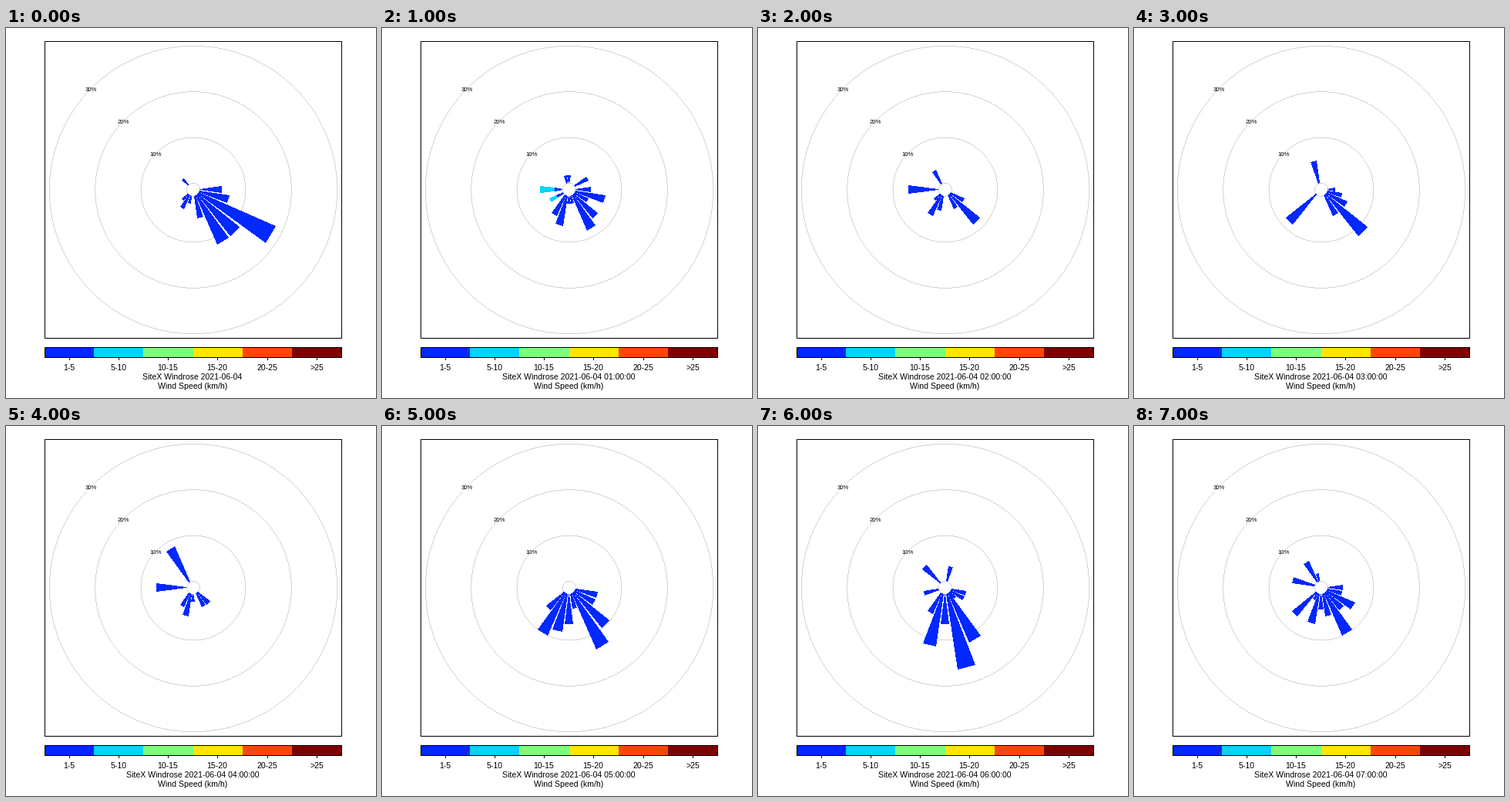
These frames come from a looping animation (480 px wide and 480 px high, 8 s). A matplotlib script:

```python
import matplotlib.pyplot as plt
import numpy as np
from matplotlib.animation import FuncAnimation

SIZE, DPI = 480, 72
CX, CY = 243, 210
HUB = 8.5            # radius of the empty centre
PER_SAMPLE = 9.9     # pixels for one sample of sixty
SECTOR, HALF = 15, 6.3
GREY, BLACK = (211, 211, 211), (0, 0, 0)
COLORS = [plt.cm.jet(k / 6, bytes=True)[:3] for k in range(1, 7)]
LABELS = ["1-5", "5-10", "10-15", "15-20", "20-25", ">25"]
BEARINGS = np.arange(0, 360, SECTOR)

# Main wind directions of each hour: bearing -> strength in samples
PEAKS = [
    {90: 3, 120: 11, 150: 7, 210: 2, 315: 1},
    {60: 2, 105: 4.2, 144: 5.3, 202: 4.5, 240: 1, 270: 1, 352: 2.5},
    {135: 5, 205: 3, 270: 4, 330: 2},
    {105: 2, 135: 7, 225: 5, 345: 3},
    {142: 3, 200: 3, 270: 4, 330: 5},
    {112: 3.3, 145: 8.5, 185: 4.5, 212: 5.9},
    {15: 2, 112: 2, 160: 10.5, 195: 7, 250: 2.5, 315: 3},
    {90: 2, 120: 4, 152: 6, 195: 3.7, 225: 4, 285: 3, 336: 5.5},
]
BRISK_PEAKS = {1: {240: 1, 270: 2}}    # second speed class

ROWS, COLS = np.mgrid[:SIZE, :SIZE] + 0.5

plt.rcParams["font.family"] = "Liberation Sans"
fig = plt.figure(figsize=(SIZE / DPI, SIZE / DPI), dpi=DPI, facecolor="white")
ax = fig.add_axes([0, 0, 1, 1])
ax.axis("off")


def samples(peaks):
    """Sum of bell curves per sector: broad in the south, narrow elsewhere."""
    total = np.zeros(len(BEARINGS))
    for bearing, strength in peaks.items():
        spread = 15 if 100 <= bearing <= 215 else 7.5
        gap = (BEARINGS - bearing + 180) % 360 - 180
        total += strength * np.exp(-(gap / spread) ** 2)
    return np.round(total).astype(int)


def polar(radius, bearing):
    a = np.radians(bearing)
    return CX + radius * np.sin(a), CY - radius * np.cos(a)


def paint_wedge(canvas, bearing, first, last, color):
    """Straight-ended spoke covering samples first..last, without smoothing."""
    r0, r1 = HUB + PER_SAMPLE * first, HUB + PER_SAMPLE * last
    corners = [(r0, -HALF), (r1, -HALF), (r1, HALF), (r0, HALF)]
    pts = np.floor([polar(r, bearing + d) for r, d in corners])
    inside = np.ones((SIZE, SIZE), bool)
    for (xa, ya), (xb, yb) in zip(pts, np.roll(pts, -1, axis=0)):
        inside &= (xb - xa) * (ROWS - ya) >= (yb - ya) * (COLS - xa)
    canvas[inside] = color


def paint_circle(canvas, radius):
    reach = np.ceil(radius / np.sqrt(2))
    along = np.arange(-reach, reach) + 0.5
    across = np.sqrt(radius ** 2 - along ** 2)
    for side in (-across, across):
        for dx, dy in ((along, side), (side, along)):
            x, y = np.floor(CX + dx), np.floor(CY + dy)
            canvas[y.astype(int), x.astype(int)] = GREY


def paint_box(canvas, x0, y0, x1, y1):
    canvas[[y0, y1], x0:x1 + 1] = BLACK
    canvas[y0:y1 + 1, [x0, x1]] = BLACK


def label(x, y, text, size=10.5):
    return ax.text(x, y, text, size=size, ha="center", va="baseline")


def make_backdrop():
    canvas = np.full((SIZE, SIZE, 3), 255, np.uint8)
    for k in range(4):
        radius = HUB + k * 6 * PER_SAMPLE
        paint_circle(canvas, radius)
        if k:
            x, y = polar(radius, 315)
            label(x - 1, y + 3.6, f"{10 * k}%", 7.8)
    paint_box(canvas, 50, 17, 435, 402)

    step = 385.5 / 6
    for k, (color, text) in enumerate(zip(COLORS, LABELS)):
        x0, x1 = round(50 + k * step), round(50 + (k + 1) * step)
        canvas[414:428, x0:x1] = color
        mid = int(50 + (k + 0.5) * step)
        canvas[428:431, mid] = BLACK
        label(mid, 444, text)
    paint_box(canvas, 50, 414, 435, 427)
    label(242, 468, "Wind Speed (km/h)")
    return canvas


backdrop = make_backdrop()
picture = ax.imshow(backdrop, extent=(0, SIZE, SIZE, 0), aspect="auto",
                    interpolation="nearest")
title = label(242, 456, "")


def update(hour):
    canvas = backdrop.copy()
    slow = samples(PEAKS[hour])
    brisk = samples(BRISK_PEAKS.get(hour, {}))
    for bearing, n, m in zip(BEARINGS, slow, brisk):
        if n:
            paint_wedge(canvas, bearing, 0, n, COLORS[0])
        if m:
            paint_wedge(canvas, bearing, n, n + m, COLORS[1])
    picture.set_data(canvas)
    clock = f" {hour:02d}:00:00" if hour else ""
    title.set_text("SiteX Windrose 2021-06-04" + clock)
    return picture, title


anim = FuncAnimation(fig, update, frames=len(PEAKS), init_func=lambda: update(0),
                     interval=1000, repeat=True, repeat_delay=0, blit=False)
plt.show()
```
